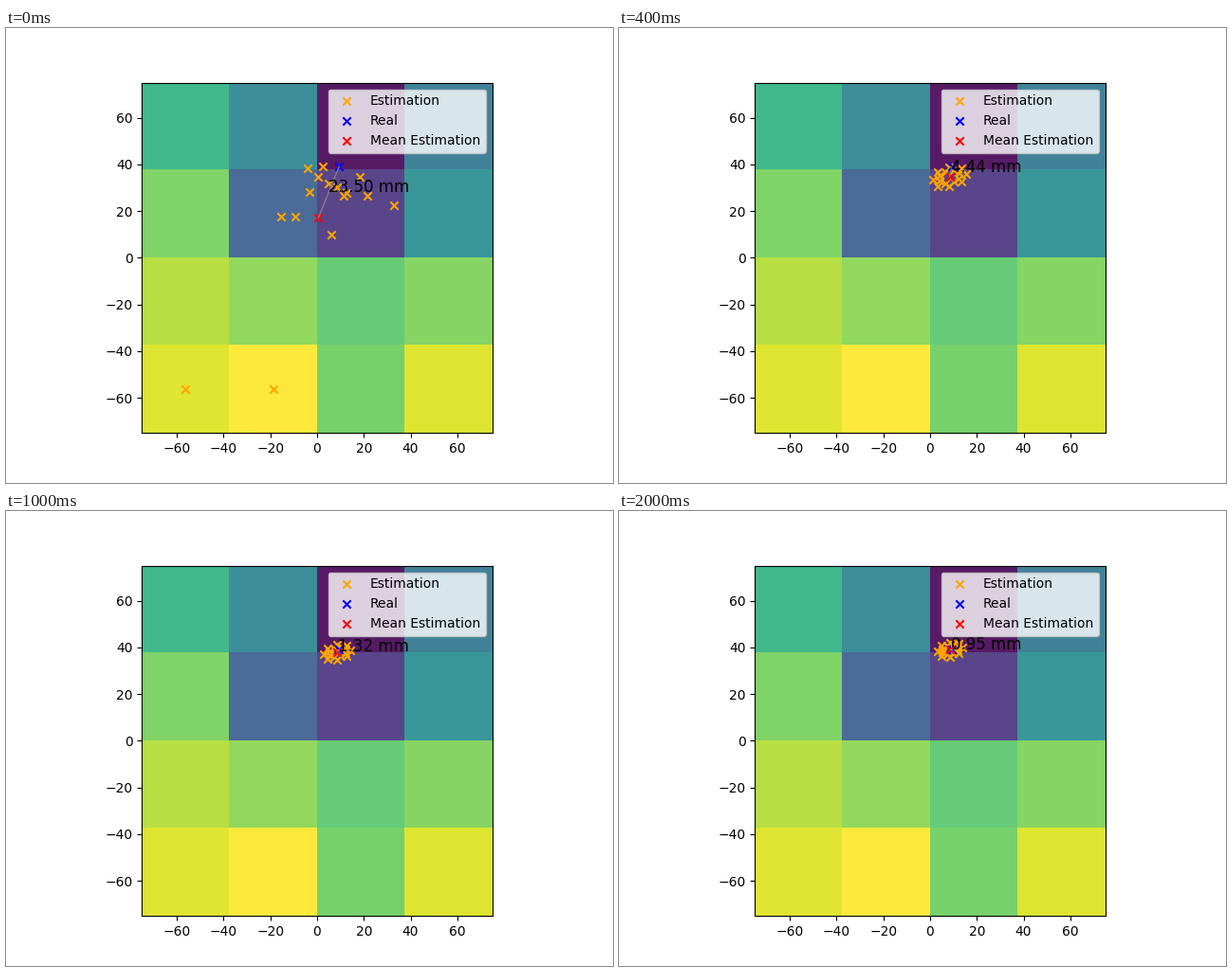
Write a matplotlib script that moves like this. It is 640 by 480 pixels and loops after 2.1 s.

```python
import numpy as np
import matplotlib.pyplot as plt
from matplotlib.animation import FuncAnimation

FRAMES, INTERVAL = 21, 100
REAL = np.array([9.4, 39.0])
PULL = 0.25      # share of the way to the cloud left after each step
SHRINK = 0.8     # share of the extra spread left after each step

cost = [[0.635, 0.44, 0.0, 0.385],
        [0.785, 0.285, 0.14, 0.478],
        [0.88, 0.82, 0.738, 0.795],
        [0.947, 1.0, 0.768, 0.945]]

start = np.array([
    (33, 22.3), (18.4, 34.5), (21.7, 26.5), (12.5, 27.6),
    (2.5, 39), (0.6, 34.5), (-4, 38.2), (-3.2, 28),
    (-15.5, 17.5), (-9.3, 17.6), (-18.75, -56.25), (6.2, 9.7),
    (5, 31.8), (8.5, 30), (11.5, 26.5), (-56.25, -56.25)])

# steps at which the last estimate overshoots
lunges = {3: (27.5, 56.5), 7: (3, 57.6)}

# distance and bearing of the mean as seen from the real spot
key_steps = [0, 3, 4, 8, 12, 16, 20]
key_error = [23.5, 4.27, 4.44, 1.82, 0.96, 0.92, 0.95]
key_bearing = [-112, -86, -104, -118, -140, -165, -180]


def mean_and_error(step):
    error = np.exp(np.interp(step, key_steps, np.log(key_error)))
    angle = np.radians(np.interp(step, key_steps, key_bearing))
    return REAL + error * np.array([np.cos(angle), np.sin(angle)]), error


def estimates(step, center):
    k = np.arange(len(start))
    angle = 2 * np.pi * k / len(k)
    radius = np.where(k % 2, 0.65, 1) * (1 + 0.85 * SHRINK ** step)
    dx = 5.2 * radius * np.cos(angle)
    dy = 3 * radius * np.sin(angle) + 0.15 * dx
    cloud = center + np.column_stack([dx, dy])

    points = cloud + (start - cloud) * PULL ** step
    points[-1] = lunges.get(step, points[-1])
    return points


fig, ax = plt.subplots(figsize=(6.4, 4.8), dpi=100)
ax.imshow(cost, cmap="viridis", vmin=0, vmax=1, alpha=0.9,
          extent=(-75, 75, -75, 75), interpolation="nearest")
ax.set_autoscale_on(False)


def crosses(color, label):
    return ax.scatter([0], [0], marker="x", color=color, label=label)


cloud_marks = crosses("orange", "Estimation")
real_mark = crosses("blue", "Real")
mean_mark = crosses("red", "Mean Estimation")
real_mark.set_offsets([REAL])
link, = ax.plot([], [], color="gray", linewidth=1)
note = ax.text(0, 0, "", fontsize=12)
legend = ax.legend(loc="upper right")


def update(step):
    mean, error = mean_and_error(step)
    points = estimates(step, mean)

    cloud_marks.set_offsets(points)
    mean_mark.set_offsets([mean])
    link.set_data(*np.transpose([REAL, mean]))
    note.set_position((REAL + mean) / 2)
    note.set_text(f"{error:.2f} mm")

    # the legend gives way to points in its corner
    covered = np.any((points[:, 0] > 5) & (points[:, 1] > 45))
    legend.set_loc("upper left" if covered else "upper right")
    return cloud_marks, mean_mark, link, note, legend


anim = FuncAnimation(fig, update, frames=FRAMES, interval=INTERVAL,
                     repeat=True, repeat_delay=0, blit=False)
plt.show()
```
